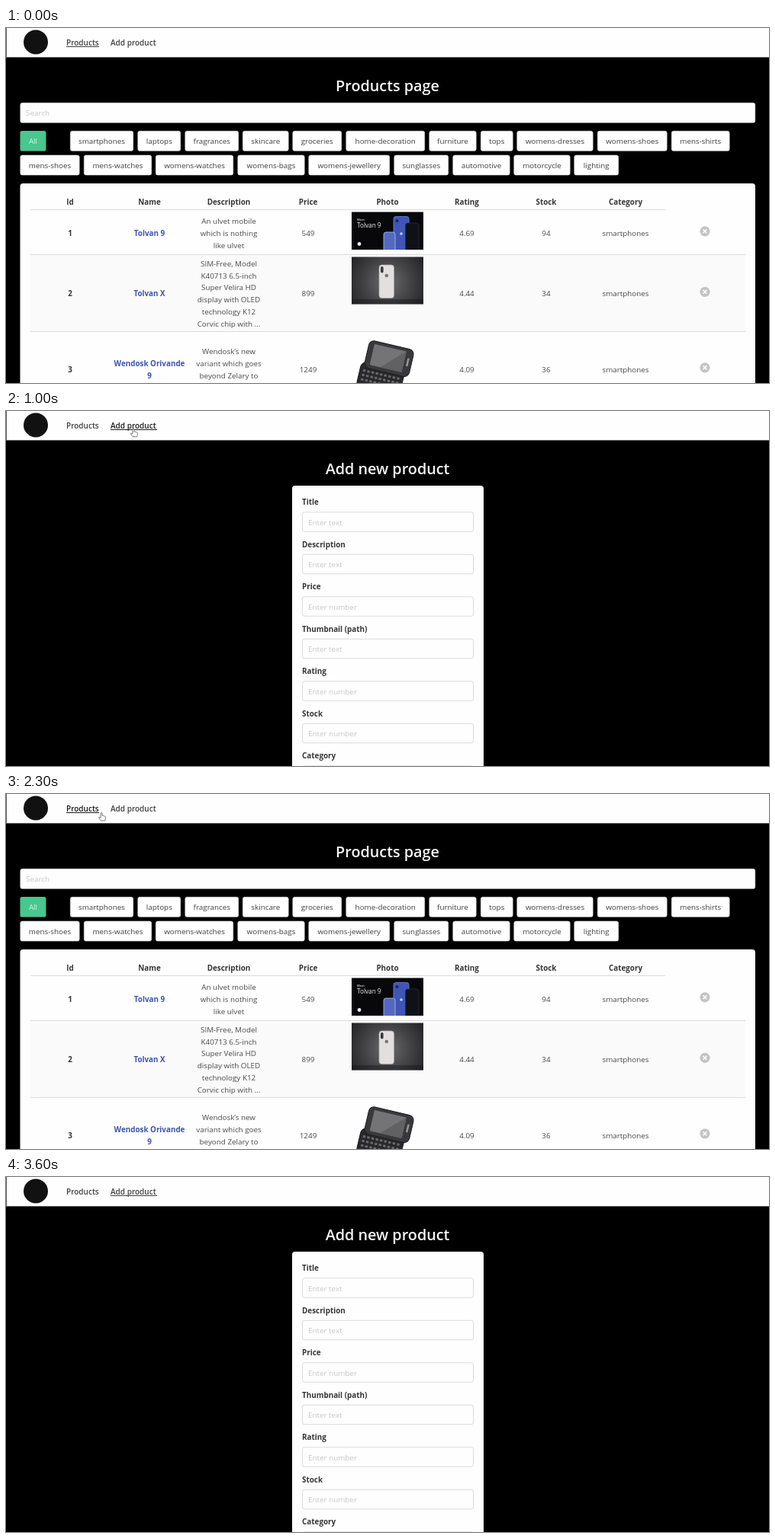
These frames come from a looping animation (1000x466 px, 4 s). An HTML page with a canvas:

```html
<!DOCTYPE html>
<html lang="en">
<head>
<meta charset="utf-8">
<title>Products</title>
<style>
  html, body { margin: 0; width: 100%; height: 100%; overflow: hidden; background: #000; }
  canvas { display: block; width: 1000px; height: 466px; }
</style>
</head>
<body>
<canvas id="stage"></canvas>
<script>
const W = 1000, H = 466, LOOP = 4000;
const canvas = document.getElementById('stage');
const ctx = canvas.getContext('2d');
const dpr = window.devicePixelRatio || 1;
canvas.width = W * dpr;
canvas.height = H * dpr;

const FONT = '"Open Sans", "Noto Sans", sans-serif';
const INK = '#4a4a4a', DARK = '#363636', LINK = '#3c54ae', LINE = '#dbdbdb', HINT = '#c6c6c6';
const LEADING = 15.8;

// label, left, width
const ROW_1 = [
  ['smartphones', 84, 83], ['laptops', 172.5, 56.5], ['fragrances', 234.5, 70.5],
  ['skincare', 310, 60.5], ['groceries', 375.5, 64.5], ['home-decoration', 445.5, 103.5],
  ['furniture', 554.5, 62], ['tops', 622, 42.5], ['womens-dresses', 669.5, 100],
  ['womens-shoes', 775, 91.5], ['mens-shirts', 872, 76.5]
];
const ROW_2 = [
  ['mens-shoes', 18.5, 78], ['mens-watches', 102, 89], ['womens-watches', 196, 102],
  ['womens-bags', 303.5, 88], ['womens-jewellery', 396.5, 106.5], ['sunglasses', 508.5, 71.5],
  ['automotive', 585.5, 75], ['motorcycle', 665.5, 74], ['lighting', 744.5, 58.5]
];
const HEADS = ['Id', 'Name', 'Description', 'Price', 'Photo', 'Rating', 'Stock', 'Category'];
const PRODUCTS = [
  { y: 269, name: ['Tolvan 9'], price: 549, rating: 4.69, stock: 94, photo: photoDuo,
    about: ['An ulvet mobile', 'which is nothing', 'like ulvet'] },
  { y: 348.5, name: ['Tolvan X'], price: 899, rating: 4.44, stock: 34, photo: photoBack,
    about: ['SIM-Free, Model', 'K40713 6.5-inch', 'Super Velira HD', 'display with OLED', 'technology K12', 'Corvic chip with ...'] },
  { y: 448, name: ['Wendosk Orivande', '9'], price: 1249, rating: 4.09, stock: 36, photo: photoSlider,
    about: ['Wendosk\u2019s new', 'variant which goes', 'beyond Zelary to', 'the horizon'] }
];
const FIELDS = [
  ['Title', 'text'], ['Description', 'text'], ['Price', 'number'], ['Thumbnail (path)', 'text'],
  ['Rating', 'number'], ['Stock', 'number'], ['Category', 'text']
];

// time, x, y of the pointer tip
const POINTER = [
  [100, 330, 475], [800, 167, 23], [1100, 167, 23], [1600, 94, 22], [2100, 94, 22],
  [2400, 136, 25], [2600, 136, 25], [2700, 145, 26], [2900, 150, 26], [3400, 330, 475]
];

function text(str, x, y, { size = 9.85, weight = 400, color = INK, align = 'center' } = {}) {
  ctx.font = `${weight} ${size}px ${FONT}`;
  ctx.fillStyle = color;
  ctx.textAlign = align;
  ctx.fillText(str, x, y);
}

function lines(list, x, mid, style) {
  const top = mid - (list.length - 1) * LEADING / 2 + 3.7;
  list.forEach((s, i) => text(s, x, top + i * LEADING, style));
}

function rect(x, y, w, h, color) {
  ctx.fillStyle = color;
  ctx.fillRect(x, y, w, h);
}

function box(x, y, w, h, r, fill, stroke, weight = 1) {
  ctx.beginPath();
  ctx.roundRect(x, y, w, h, r);
  ctx.fillStyle = fill;
  ctx.fill();
  if (stroke) {
    ctx.strokeStyle = stroke;
    ctx.lineWidth = weight;
    ctx.stroke();
  }
}

function disc(x, y, r, color) {
  ctx.beginPath();
  ctx.arc(x, y, r, 0, Math.PI * 2);
  ctx.fillStyle = color;
  ctx.fill();
}

function photoDuo() {
  rect(453, 241.5, 94, 49.5, '#08080b');
  text('Meet', 460, 253, { size: 4, weight: 600, color: '#ddd', align: 'left' });
  text('Tolvan 9', 460, 262, { size: 8.2, color: '#f4f4f4', align: 'left' });
  disc(463, 283.5, 2.4, '#eee');
  ctx.save();
  ctx.beginPath();
  ctx.rect(453, 241.5, 94, 49.5);
  ctx.clip();
  box(508, 247.5, 20, 50, 3, '#3f55b8', '#7186d6', 0.8);
  disc(512.5, 253, 2, '#1b2450');
  disc(518, 270, 1.8, '#c3cdf4');
  box(495, 268, 15, 32, 3, '#5369c0', '#b4bfe8', 0.8);
  box(523.5, 256, 17.5, 42, 3, '#101116', '#2d2f38', 0.8);
  ctx.restore();
}

function photoBack() {
  const glow = ctx.createRadialGradient(500, 334, 4, 500, 334, 56);
  glow.addColorStop(0, '#68686b');
  glow.addColorStop(0.5, '#434346');
  glow.addColorStop(1, '#242427');
  rect(453, 300.5, 94, 62, glow);
  rect(453, 356, 94, 6.5, 'rgba(20,20,22,.4)');
  box(489, 311, 19.5, 43.5, 3.5, '#e2e0df', '#a8a6a6', 0.7);
  box(491, 313, 3.6, 8.5, 1.8, '#38383b');
  disc(498.8, 325, 2.3, '#77777a');
}

function photoSlider() {
  ctx.save();
  ctx.translate(480, 410);
  ctx.rotate(0.23);
  box(-7, 30, 58, 34, 7, '#29292b', '#19191b');
  for (let r = 0; r < 3; r++)
    for (let c = 0; c < 9; c++)
      box(-3 + c * 5.7, 39.5 + r * 6, 3.6, 3, 1, '#69696c');
  box(-3, 0, 60, 37, 7, '#39393b', '#1d1d1f');
  box(4, 4, 43, 28, 1.5, '#747477');
  ctx.beginPath();
  ctx.moveTo(47, 4);
  ctx.lineTo(47, 32);
  ctx.lineTo(18, 32);
  ctx.closePath();
  ctx.fillStyle = '#616164';
  ctx.fill();
  box(50.5, 12, 2.5, 11, 1, '#98989b');
  ctx.restore();
}

function closeButton(x, y) {
  disc(x, y, 6.6, '#c4c4c4');
  ctx.strokeStyle = '#fff';
  ctx.lineWidth = 1.5;
  ctx.beginPath();
  ctx.moveTo(x - 2.4, y - 2.4);
  ctx.lineTo(x + 2.4, y + 2.4);
  ctx.moveTo(x + 2.4, y - 2.4);
  ctx.lineTo(x - 2.4, y + 2.4);
  ctx.stroke();
}

function navItem(label, x, w, active, hover) {
  const color = hover ? '#1c1c1c' : '#404040';
  text(label, x, 23, { size: 10, weight: 600, color, align: 'left' });
  if (active) rect(x, 24, w, 1, color);
}

function navbar(adding, px, py) {
  rect(0, 0, W, 38.4, '#fefefe');
  rect(0, 0, 1, 38.4, '#555');
  disc(39, 18.5, 16, '#111');
  const over = py < 38;
  navItem('Products', 79, 43, !adding, over && px > 75 && px < 126);
  navItem('Add product', 137, 61, adding, over && px > 133 && px < 202);
}

function title(str) {
  text(str, 500, 82.5, { size: 19.8, weight: 600, color: '#f6f6f6' });
}

function chips(list, y) {
  for (const [label, x, w] of list) {
    box(x + 0.3, y + 0.3, w - 0.6, 26, 2.6, '#fefefe', LINE, 0.6);
    text(label, x + w / 2, y + 17.2, { color: '#404040' });
  }
}

function productsPage() {
  title('Products page');
  box(18.8, 98.3, 963, 26, 2.6, '#fefefe', LINE, 0.6);
  text('Search', 26, 115, { color: HINT, align: 'left' });

  box(18.5, 135, 34, 26.5, 2.6, '#48c78e');
  text('All', 35.5, 152.2, { color: '#d8f3e6' });
  chips(ROW_1, 135);
  chips(ROW_2, 166.7);

  box(18.5, 204, 963.5, 290, 4, '#fefefe');
  HEADS.forEach((s, i) => text(s, 84 + i * 104, 231.8, { weight: 700, color: DARK }));
  rect(32, 298, 937, 100, '#fafafa');
  rect(32, 238, 832, 1, LINE);
  rect(32, 297, 937, 1, LINE);
  rect(32, 398, 937, 1, LINE);

  PRODUCTS.forEach((p, i) => {
    const cell = (col, list, style) => lines(list, 84 + col * 104, p.y, style);
    cell(0, [i + 1], { weight: 700, color: DARK });
    cell(1, p.name, { weight: 700, color: LINK });
    cell(2, p.about);
    cell(3, [p.price]);
    p.photo();
    cell(5, [p.rating]);
    cell(6, [p.stock]);
    cell(7, ['smartphones']);
    closeButton(916, p.y - 2.2);
  });
}

function formPage() {
  title('Add new product');
  box(375, 98, 251, 400, 4, '#fefefe');
  FIELDS.forEach(([label, kind], i) => {
    const y = 119.5 + i * 55.5;
    text(label, 388, y + 3.7, { size: 9.9, weight: 700, color: DARK, align: 'left' });
    box(388.5, y + 13.3, 224, 25.5, 2.6, '#fefefe', LINE);
    text('Enter ' + kind, 396, y + 30.3, { color: HINT, align: 'left' });
  });
}

function pointerAt(t) {
  const i = POINTER.findIndex(k => k[0] > t);
  if (i < 1) return null;
  const [t0, x0, y0] = POINTER[i - 1], [t1, x1, y1] = POINTER[i];
  const u = (t - t0) / (t1 - t0), e = u * u * (3 - 2 * u);
  return [x0 + (x1 - x0) * e, y0 + (y1 - y0) * e];
}

const HAND = new Path2D('M-1 .8Q0 -.4 1 .8V4.2Q2.2 3.6 2.8 4.6Q4 4.2 4.3 5.2Q5.4 5 5.4 6.3V8.2Q5.2 9.6 4.5 10.8H-.8Q-1.8 9.2 -3.4 7.3Q-3.7 5.8 -2.2 6.2L-1 7.2Z');
const ARROW = new Path2D('M0 0V10.5L2.5 8.2L4.1 11.8L5.6 11.1L4 7.7H7.4Z');

function pointer(x, y) {
  const shape = y < 36 ? HAND : ARROW;
  ctx.save();
  ctx.translate(x, y);
  ctx.fillStyle = '#fff';
  ctx.strokeStyle = '#666';
  ctx.lineWidth = 0.9;
  ctx.fill(shape);
  ctx.stroke(shape);
  ctx.restore();
}

function draw(now) {
  // the screen advances in tenths of a second
  const t = Math.floor((now % LOOP) / 100) * 100;
  const adding = (t >= 1000 && t < 2000) || t >= 2900;
  const pos = pointerAt(t);

  ctx.setTransform(dpr, 0, 0, dpr, 0, 0);
  rect(0, 0, W, H, '#000');
  navbar(adding, ...(pos || [-99, 99]));
  if (adding) formPage();
  else productsPage();
  if (pos) pointer(...pos);
}

let start;
function tick(now) {
  start ??= now;
  draw(now - start);
  requestAnimationFrame(tick);
}
requestAnimationFrame(tick);
</script>
</body>
</html>
```
